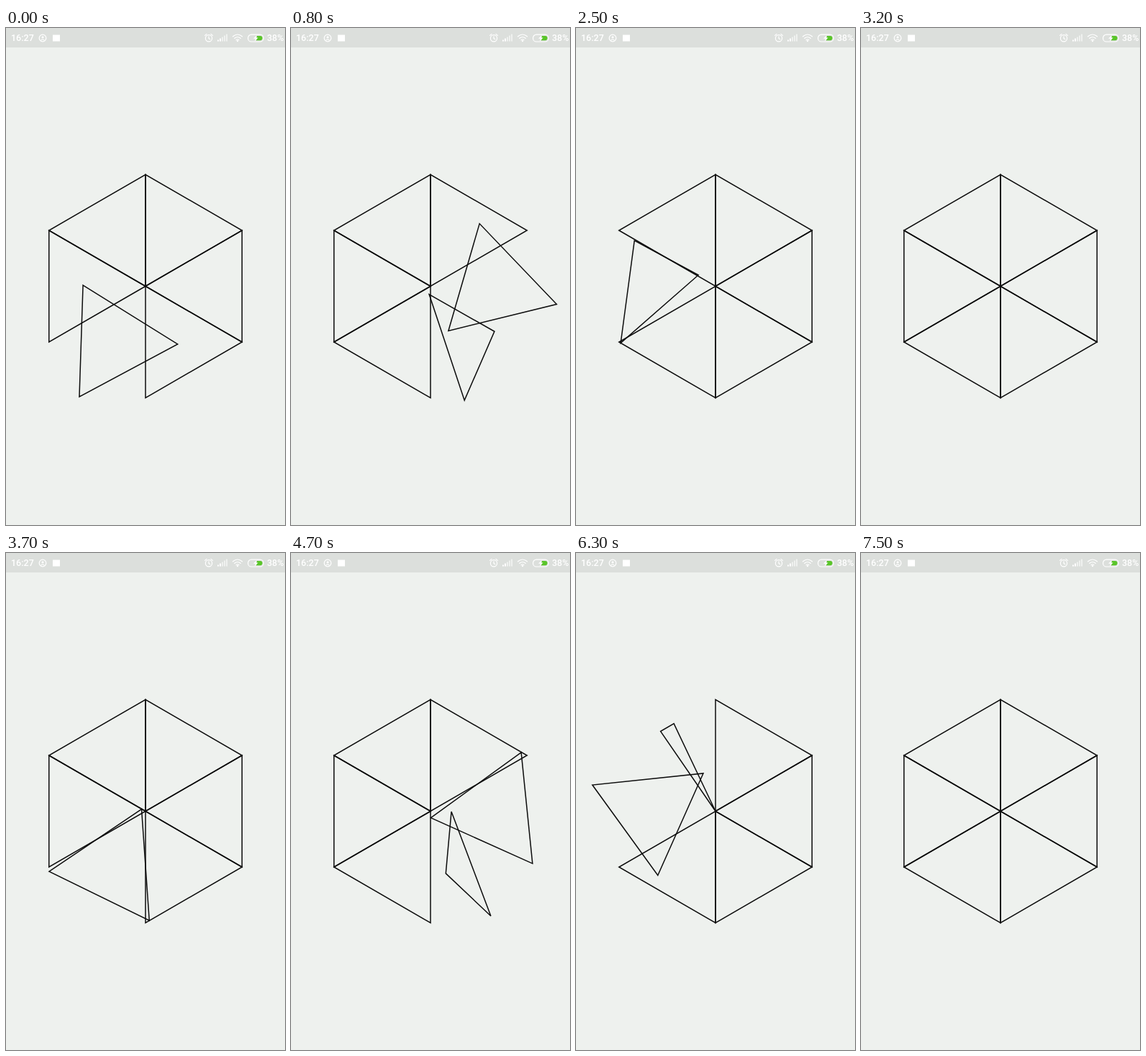
Write an HTML page that moves like this. It is 388 px wide and 690 px high and loops after 7600 ms.

```html
<!DOCTYPE html>
<html lang="en">
<head>
<meta charset="utf-8">
<title>Turning hexagon</title>
<style>
  html, body { margin: 0; width: 100%; height: 100%; overflow: hidden; background: #eef1ee; }
  svg { display: block; width: 388px; height: 690px; }
  text { font: 500 12.5px Roboto, Arial, sans-serif; fill: #fff; }
  .line { fill: none; stroke: #fff; stroke-width: 1.2; stroke-linecap: round; }
  .solid { fill: #fff; }
  #hexagon { fill: none; stroke: #0c0c0c; stroke-width: 1.5; stroke-linejoin: miter; }
</style>
</head>
<body>
<svg viewBox="0 0 388 690">
  <rect width="388" height="690" fill="#eef1ee"/>
  <rect width="388" height="27" fill="#dcdfdc"/>

  <text x="7" y="18.3">16:27</text>
  <circle class="line" cx="51" cy="14" r="4.8"/>
  <circle class="solid" cx="51" cy="12.7" r="1.5"/>
  <path class="line" d="M49 17q2-2.5 4 0"/>
  <rect class="solid" x="65" y="9.5" width="10" height="9"/>

  <circle class="line" cx="282" cy="14.3" r="4.6"/>
  <path class="line" d="M282 11.8v2.8l1.8 1M276.6 10.4l2.4-2M287.4 10.4l-2.4-2"/>
  <path class="solid" d="M294 16.5h2v2h-2zM297 14.5h2v4h-2z"/>
  <path class="solid" opacity=".55" d="M300 12.5h2v6h-2zM303 10.5h2v8h-2zM306 8.5h2v10h-2z"/>
  <path class="line" stroke-width="1.6" d="M315.5 11.8q6.5-5.6 13 0M317.8 14.3q4.2-3.6 8.4 0M320 16.6q2-1.7 4 0"/>
  <circle class="solid" cx="322" cy="18" r="1.2"/>
  <rect class="line" x="336.6" y="9.2" width="21.4" height="9.8" rx="4.6"/>
  <path d="M349 11h4.5a3.1 3.1 0 0 1 0 6.2H348z" fill="#5ac52a"/>
  <path class="solid" d="M348.5 10l-4.5 4.8h3l-1.2 3.6 4.8-5h-3z"/>
  <text x="363" y="18.3">38%</text>

  <g id="hexagon"></g>
</svg>
<script>
  const LOOP = 7600, SIDE = 155, RADIUS = SIDE / Math.sqrt(3);
  const CX = 194, CY = 358.5;
  const SPIN_TIME = 362, FLIP_START = 400, FLIP_TIME = 530;
  const rad = deg => deg * Math.PI / 180;
  const clamp = v => Math.min(1, Math.max(0, v));

  // Directions of the six triangles, in the order in which they turn.
  const slots = [120, 60, 0, -60, -120, 180];

  // Start in ms, tilt during the flip, corner on the flip axis (0: flip end over end).
  const moves = [
    [-320, -21.6, 0], [122, -21.6, 0], [565, -21.6, 0],
    [1029, 10.7, 120], [1515, 0, 120], [1999, -2.3, 240],
    [3641, -21.6, 0], [4144, -21.6, 0], [4628, -21.6, 0],
    [5150, 10.7, 120], [5685, 0, 120], [6097, -21.6, 0]
  ];

  const group = document.getElementById('hexagon');
  const triangles = slots.map(() => group.appendChild(
    document.createElementNS('http://www.w3.org/2000/svg', 'polygon')));

  function pose(age, tilt, corner) {
    const spin = -30 * (1 - Math.cos(Math.PI * clamp(age / SPIN_TIME)));
    const flip = 1 - Math.pow(1 - clamp((age - FLIP_START) / FLIP_TIME), 1.5);
    const squash = Math.cos(Math.PI * flip);
    const extra = corner ? -60 * clamp((age - FLIP_START) / 100) : 0;
    return {
      angle: spin + extra + tilt * Math.sin(Math.PI * flip),
      corner,
      along: corner ? 1 : squash,
      across: corner ? squash : 1
    };
  }

  function corners(slot, p) {
    const x0 = CX + RADIUS * Math.cos(rad(slot));
    const y0 = CY + RADIUS * Math.sin(rad(slot));
    const turn = rad(slot + 180 + p.angle + p.corner);
    const c = Math.cos(turn), s = Math.sin(turn);
    return [0, 120, 240].map(a => {
      const x = RADIUS * Math.cos(rad(a - p.corner)) * p.along;
      const y = RADIUS * Math.sin(rad(a - p.corner)) * p.across;
      return (x0 + x * c - y * s).toFixed(2) + ',' + (y0 + x * s + y * c).toFixed(2);
    }).join(' ');
  }

  function draw(t) {
    slots.forEach((slot, i) => {
      const move = t < moves[i + 6][0] ? moves[i] : moves[i + 6];
      const [start, tilt, corner] = move;
      triangles[i].setAttribute('points', corners(slot, pose(t - start, tilt, corner)));
    });
  }

  const begin = performance.now();
  function tick() {
    draw((performance.now() - begin) % LOOP);
    requestAnimationFrame(tick);
  }
  draw(0);
  requestAnimationFrame(tick);
</script>
</body>
</html>
```
